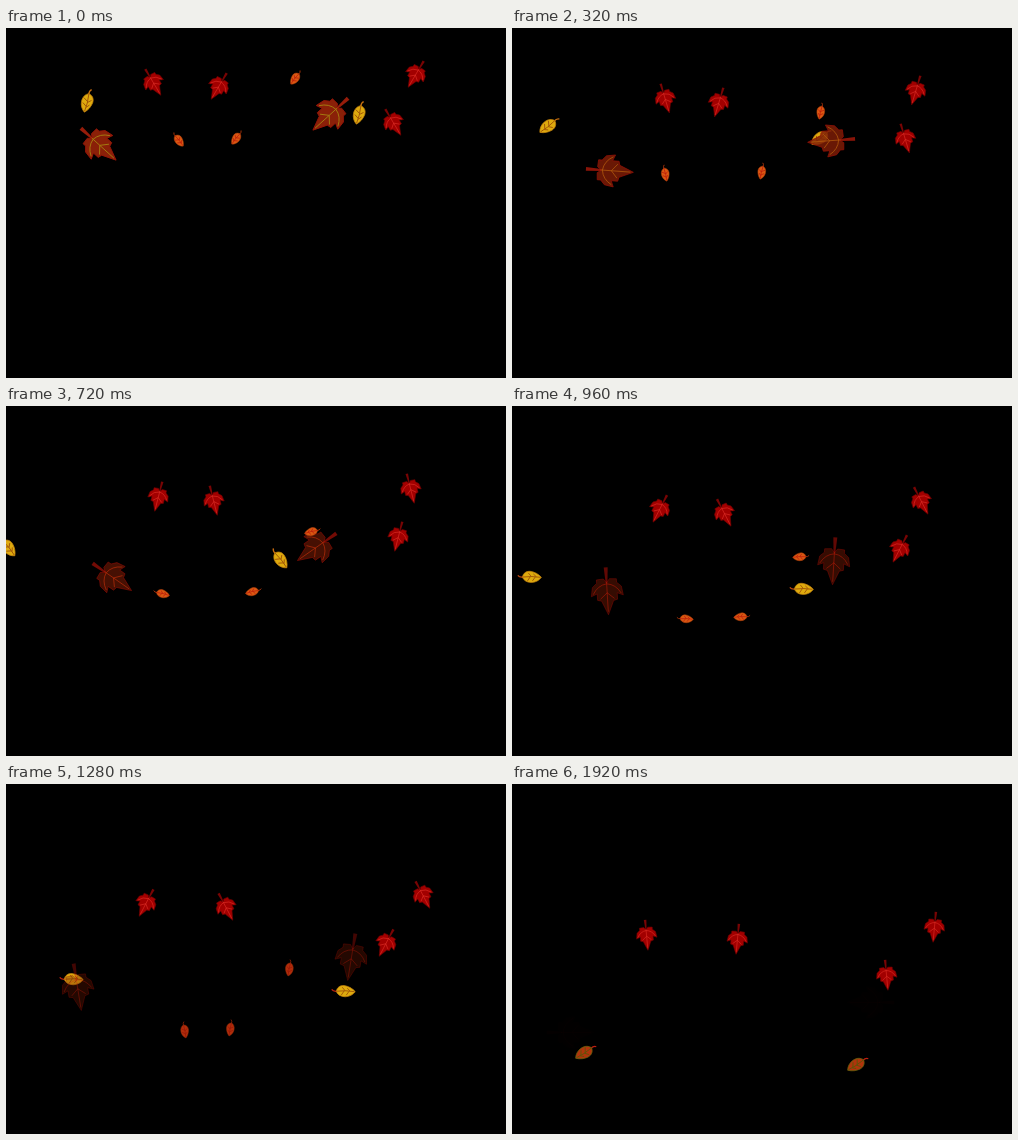
An HTML page with a canvas that plays this animation: 500 by 350 pixels, repeating every 2 s.

```html
<!DOCTYPE html>
<html lang="en">
<head>
<meta charset="utf-8">
<title>Falling leaves</title>
<style>
html, body { margin: 0; width: 100%; height: 100%; overflow: hidden; background: #000; }
canvas { display: block; width: 500px; height: 350px; }
</style>
</head>
<body>
<canvas id="stage" width="500" height="350"></canvas>
<script>
const ctx = document.getElementById('stage').getContext('2d');
const LOOP = 2000, STEP = 80, END = LOOP - STEP;

const mix = (a, b, k) => a + (b - a) * k;
const ramp = (t, from, to) => Math.min(1, Math.max(0, (t - from) / (to - from)));
const ease = k => (1 - Math.cos(Math.PI * k)) / 2;
const wave = (t, period) => Math.sin(2 * Math.PI * t / period);
const blend = (a, b, k) => `rgb(${a.map((v, i) => Math.round(mix(v, b[i], k))).join(',')})`;

// Pendulum motion between turning points [time, value]
const swing = (t, points) => points.reduce((value, [time, next], i) =>
  i ? mix(value, next, ease(ramp(t, points[i - 1][0], time))) : next, 0);

// Leaves of a kind share one motion: steady fall, swaying x and turn.
// Turn 0 has the stem up and the tip down.
const motion = {
  red: {
    x: [[-700, 135], [500, 154], [1740, 134.5]],
    turn: [[-60, -31], [1120, 30], [2200, -12]],
    y: t => 54 + 0.0505 * t,
    alpha: () => 1
  },
  big: {
    x: [[-400, 100], [100, 91.5], [620, 107], [1700, 54], [2200, 64]],
    turn: [[-100, -44], [460, -93], [1060, 3], [2000, -92]],
    y: t => 116 + 0.0703 * t + 5 * wave(t, 2100),
    alpha: t => 1 - t / 1960
  },
  gold: {
    x: [[-180, 90], [700, 2], [1680, 102], [2000, 68]],
    turn: [[-60, 10], [320, 50], [1000, -92], [1220, -92], [2150, 80]],
    y: t => 68 + 0.1015 * t + 5.5 * wave(t + 240, 960),
    alpha: () => 1
  },
  small: {
    x: [[-120, 175], [500, 148], [1170, 181], [1900, 138]],
    turn: [[0, -40], [240, -12], [900, -92], [1400, 0]],
    y: t => 112 + 0.105 * t,
    alpha: t => 1 - (t / END) ** 6
  }
};

// [kind, dx, dy, mirrored]; a mirrored leaf is placed at dx - x
const leaves = [
  ['gold', 0, 0], ['gold', 272, 12],
  ['big', 0, 0], ['big', 417, -30, true],
  ['small', 0, 0], ['small', 403, -2, true], ['small', 462, -62, true],
  ['red', 0, 0], ['red', 240, 40], ['red', 360, 4, true], ['red', 557, -8, true]
];

function symmetric(half) {
  const p = new Path2D();
  half.concat(half.slice(1, -1).reverse().map(([x, y]) => [-x, y]))
    .forEach(([x, y]) => p.lineTo(x, y));
  p.closePath();
  return p;
}

const maple = symmetric([[0, -8], [3, -12], [10, -11.5], [10, -8],
  [14.5, -4], [16, 5], [10, 2.5], [10, 9], [6, 10], [0, 24]]);
const mapleVeins = new Path2D(
  'M0 -9V21 M0 -7Q9 -6 14 3 M0 -7Q-9 -6 -14 3 M0 2L7 8 M0 2L-7 8');
const mapleStem = new Path2D('M-2 -23.5H2L.9 -8H-.9Z');

const oval = new Path2D('M0 -8C4 -7 6 -4 5.6 0C5 4 3 8 -.5 11C-3.5 9 -5.6 5 -5.6 1C-5.6 -4 -3 -7 0 -8Z');
const ovalVeins = new Path2D('M0 -8Q1 2 -.5 10 M.3 1L4 -2 M0 6L3 3 M.4 0L-4 -3 M0 5L-4 2');
const ovalStem = new Path2D('M0 -7Q-.5 -11 1.8 -12.5');

function fill(path, color) {
  ctx.fillStyle = color;
  ctx.fill(path);
}

function stroke(path, color, width) {
  ctx.strokeStyle = color;
  ctx.lineWidth = width;
  ctx.stroke(path);
}

function drawMaple(body, edge, veins, stem) {
  fill(mapleStem, stem);
  fill(maple, body);
  stroke(maple, edge, 0.9);
  stroke(mapleVeins, veins, 0.9);
}

function drawOval(body, edge, veins, stem) {
  stroke(ovalStem, stem, 1.3);
  fill(oval, body);
  stroke(oval, edge, 0.7);
  stroke(ovalVeins, veins, 0.9);
}

const draw = {
  red() {
    ctx.scale(0.64, 0.64);
    drawMaple('#a20000', '#700000', '#e03028', '#780404');
  },
  big(t) {
    const k = ramp(t, 0, 900);
    drawMaple(blend([138, 32, 8], [104, 24, 4], k), blend([150, 20, 8], [140, 10, 6], k),
      blend([164, 124, 16], [210, 30, 10], k), blend([150, 28, 10], [190, 16, 8], k));
  },
  gold(t) {
    const k = ramp(t, 1600, END);
    drawOval(blend([222, 170, 14], [176, 52, 12], k), blend([196, 130, 14], [100, 100, 12], k),
      blend([160, 84, 8], [96, 84, 8], k), blend([200, 110, 14], [190, 30, 16], ramp(t, 700, 1300)));
  },
  small(t) {
    const k = ramp(t, 960, 1600);
    ctx.scale(0.7, 0.7);
    drawOval(blend([218, 88, 18], [170, 10, 6], k), blend([176, 64, 12], [112, 28, 8], k),
      blend([184, 20, 10], [110, 20, 6], k), blend([160, 50, 10], [90, 14, 6], k));
  }
};

function render(t) {
  ctx.fillStyle = '#000';
  ctx.fillRect(0, 0, 500, 350);
  for (const [kind, dx, dy, mirrored] of leaves) {
    const m = motion[kind];
    ctx.save();
    ctx.translate(dx, dy);
    if (mirrored) ctx.scale(-1, 1);
    ctx.translate(swing(t, m.x), m.y(t));
    ctx.rotate(swing(t, m.turn) * Math.PI / 180);
    ctx.globalAlpha = m.alpha(t);
    draw[kind](t);
    ctx.restore();
  }
}

const start = performance.now();
function tick() {
  const t = Math.max(0, performance.now() - start) % LOOP;
  render(Math.floor(t / STEP) * STEP);
  requestAnimationFrame(tick);
}
tick();
</script>
</body>
</html>
```
